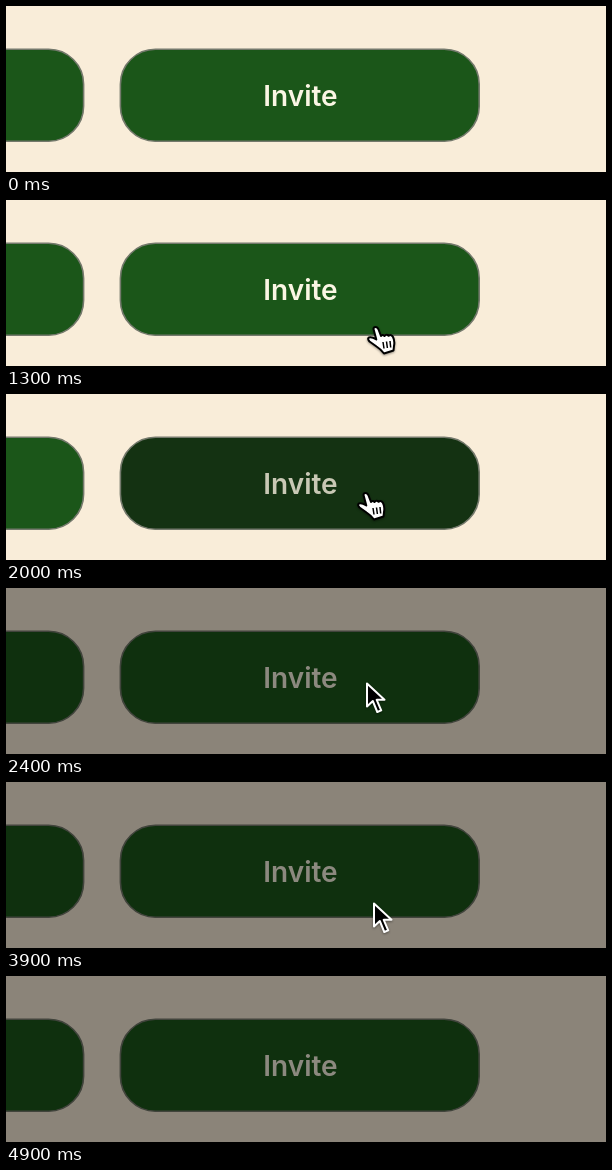
An HTML page that plays this animation: 600x166 px, repeating every 5.1 s.

```html
<!DOCTYPE html>
<html lang="en">
<meta charset="utf-8">
<title>Invite button</title>
<style>
  html, body { margin: 0; width: 100%; height: 100%; overflow: hidden; background: #f9edd9; }
  svg { display: block; width: 600px; height: 166px; }
  .button { fill: #1b5619; stroke: #74796c; stroke-width: 1.6; }
  .hover { fill: #143212; }
  text { font: 600 28px Inter, Roboto, sans-serif; text-anchor: middle; fill: #fbf6e4; }
  .hover + text { fill: #c9c8b5; }
  .cursor { stroke-width: 2; stroke-linejoin: round; filter: drop-shadow(0 1.5px 1px #0006); }
</style>
<svg viewBox="0 0 600 166">
  <rect class="button" x="-281.6" y="43.2" width="359.2" height="92" rx="35"/>
  <rect class="button" id="invite" x="114.4" y="43.2" width="358.8" height="92" rx="35"/>
  <text x="294.5" y="100">Invite</text>
  <rect id="shade" width="600" height="166" opacity=".445"/>
  <g class="cursor" id="hand" fill="#fff" stroke="#000">
    <path d="M-2 2Q-2 0 0 0Q2 0 3 2.5L5.5 9Q7 7 9 9Q11 6.8 13 8.8Q16 7 17.5 10Q19.5 14 18.5 19L18 23.5 8.5 26.5Q5 22 1 19.5L-6 14.5Q-8.5 11.5-6.5 10.5Q-4 9.5 .8 12.5Z"/>
    <path stroke-width="1.5" d="M7.5 15l1 6.5M11 14.5l.9 6.5M14.5 14l.7 6.5"/>
  </g>
  <path class="cursor" id="arrow" stroke="#fff" d="M1 2.5V25.5L6.8 20 11.3 31 15.2 29.3 10.7 18.8H18.5Z"/>
</svg>
<script>
  const LOOP = 5100, STEP = 100, HOVER = 1400, DIM = 2400;
  const handPath = [[1200, 377, 148], [1300, 369.5, 127], [1400, 363, 119], [1500, 360, 106], [1600, 359.5, 99]];
  const arrowPath = [[DIM, 360, 93], [3900, 367, 119], [4000, 372, 147]];
  const [invite, shade, hand, arrow] =
    ['invite', 'shade', 'hand', 'arrow'].map(id => document.getElementById(id));

  const show = (el, on) => el.setAttribute('visibility', on ? 'visible' : 'hidden');

  // The pointer holds each position until the next one is due.
  function place(el, path, t, end) {
    const key = path.filter(k => k[0] <= t).pop();
    show(el, key && t < end);
    if (key) el.setAttribute('transform', `translate(${key[1]} ${key[2]})`);
  }

  function draw(now) {
    const t = Math.floor(now % LOOP / STEP) * STEP;
    invite.classList.toggle('hover', t >= HOVER && t < DIM);
    show(shade, t >= DIM);
    place(hand, handPath, t, DIM);
    place(arrow, arrowPath, t, 4100);
  }

  const start = performance.now();
  function frame() {
    draw(performance.now() - start);
    requestAnimationFrame(frame);
  }
  frame();
</script>
</html>
```
